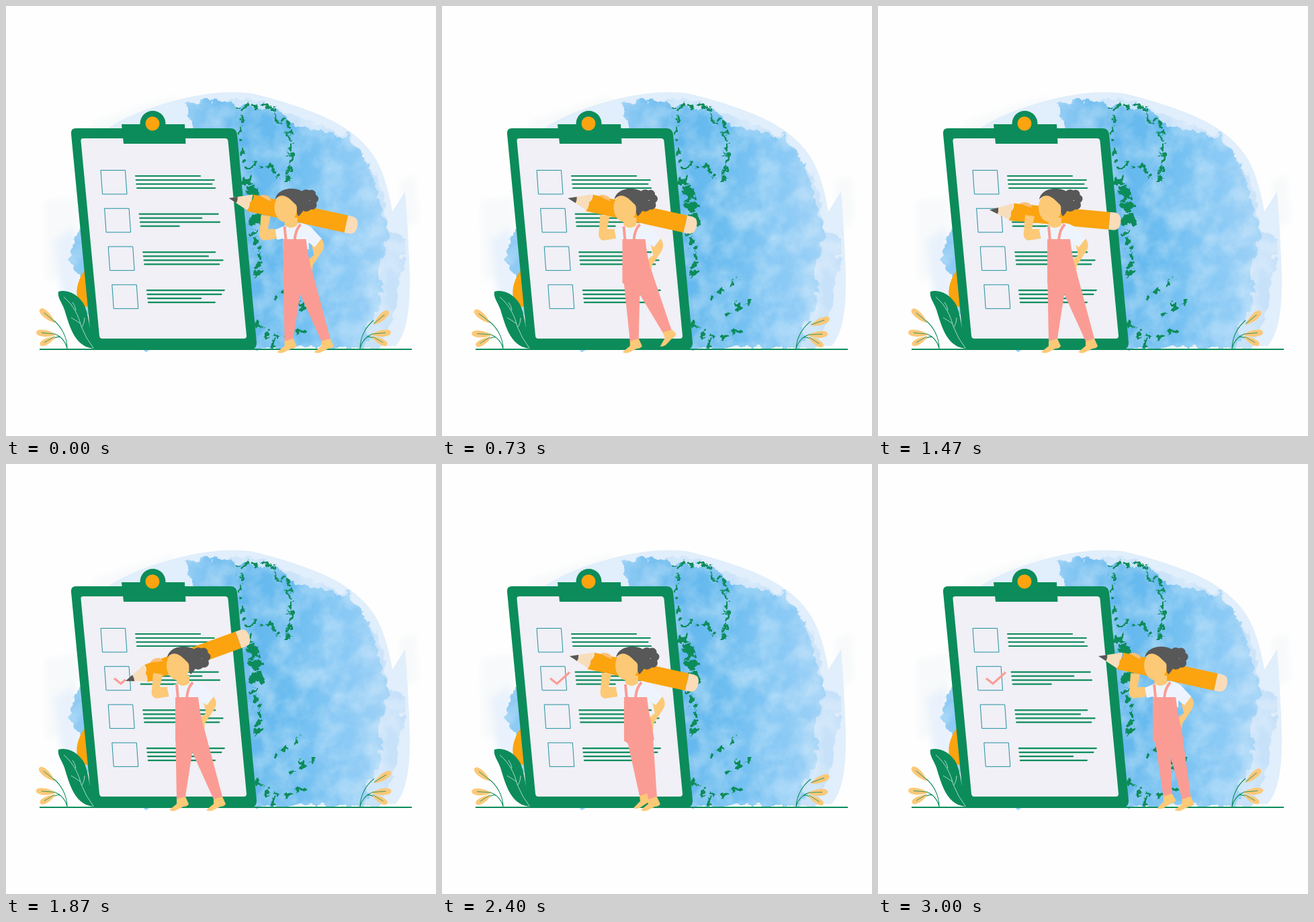
These frames come from a looping animation (640 px wide and 640 px high, 3.07 s). An HTML page:

```html
<!DOCTYPE html>
<html lang="en">
<head>
<meta charset="utf-8">
<title>Checklist</title>
<style>
html, body { margin: 0; width: 100%; height: 100%; overflow: hidden; background: #fefefe; }
svg { position: absolute; left: 0; top: 0; width: 640px; height: 640px; }
#paint { will-change: transform; }
.green { fill: #0c8c5a; }
.skin { fill: #fcc977; }
.pink { fill: #fb9c94; }
.hair { fill: #585858; }
.line { fill: none; stroke: #0c8c5a; }
</style>
</head>
<body>
<!-- Watercolour backdrop -->
<svg id="paint" viewBox="0 0 640 640">
  <defs>
    <linearGradient id="wash" gradientUnits="userSpaceOnUse" x1="270" x2="575" y1="0" y2="0">
      <stop offset="0" stop-color="#8dcaf4"/>
      <stop offset=".28" stop-color="#62b7ed"/>
      <stop offset=".5" stop-color="#6cbdf0"/>
      <stop offset=".75" stop-color="#86c8f5"/>
      <stop offset="1" stop-color="#a3d3f7"/>
    </linearGradient>
    <filter id="torn" filterUnits="userSpaceOnUse" x="0" y="90" width="640" height="450" color-interpolation-filters="sRGB">
      <feTurbulence type="fractalNoise" baseFrequency=".06" numOctaves="4" seed="4"/>
      <feDisplacementMap in="SourceGraphic" scale="20" xChannelSelector="R" yChannelSelector="G" result="shape"/>
      <feTurbulence type="fractalNoise" baseFrequency=".03" numOctaves="5" seed="9"/>
      <feColorMatrix values="0 0 0 0 1  0 0 0 0 1  0 0 0 0 1  .7 0 0 0 -.23"/>
      <feComposite in2="shape" operator="in" result="grain"/>
      <feMerge><feMergeNode in="shape"/><feMergeNode in="grain"/></feMerge>
    </filter>
    <filter id="rough" filterUnits="userSpaceOnUse" x="320" y="120" width="170" height="400">
      <feTurbulence type="fractalNoise" baseFrequency=".09" numOctaves="3" seed="7"/>
      <feDisplacementMap in="SourceGraphic" scale="18" xChannelSelector="R" yChannelSelector="G"/>
    </filter>
    <filter id="soft"><feGaussianBlur stdDeviation="4"/></filter>
  </defs>
  <g filter="url(#soft)">
    <path fill="#f7f9fa" d="M58 290L105 285 115 405 60 408ZM585 262L608 252 614 320 592 335ZM130 172L250 134 280 182 130 184Z"/>
    <path fill="#e9f2fc" d="M72 350L100 330 120 460 82 425Z"/>
  </g>
  <path fill="#e1eefb" d="M150 183Q190 156 262 138Q320 124 366 130Q420 143 462 160Q522 184 548 224Q566 252 575 306L594 276Q599 340 601 400Q603 480 580 506L372 510 340 183Z"/>
  <g filter="url(#torn)">
    <path fill="#c6e1f9" d="M270 145L370 140 440 165 510 195 556 260 570 335 592 345 590 400 575 470 555 508H400Z"/>
    <path fill="url(#wash)" d="M270 145L310 140 350 150 400 150 430 176 508 196 530 220 548 256 556 300 570 332 556 400 560 440 538 478 536 508H130L112 405 92 378 106 335 278 182Z"/>
  </g>
  <g class="line" filter="url(#rough)">
    <path stroke-width="4" stroke-dasharray="17 5 9 3" d="M345 151L398 148 402 168 420 176 424 212 421 262"/>
    <path stroke-width="5" stroke-dasharray="7 8 12 6" d="M348 163L352 238 390 236 410 258"/>
    <path stroke-width="15" stroke-dasharray="13 3 22 2" d="M356 255L370 285 376 325"/>
    <path stroke-width="8" stroke-dasharray="9 7 5 5" d="M364 318L380 378 372 408"/>
    <path stroke-width="6" stroke-dasharray="10 8" d="M398 440L420 420 440 405M424 464L445 442 466 440M398 490L424 493 446 482M374 470L402 506"/>
  </g>
</svg>

<svg viewBox="0 0 640 640">
  <defs>
    <g id="spike">
      <path fill="#fcc879" d="M15 1C4 7 -15 7 -15 0S4 -6 15 1Z"/>
      <path class="line" stroke-width=".8" d="M-7 0H14"/>
    </g>
    <g id="sprig">
      <path class="line" stroke-width="1.1" d="M91 510C91 492 82 477 71 468M91 510C88 497 79 489 70 488M81 493Q77 491 70 495"/>
      <use href="#spike" transform="translate(60 487) rotate(5)"/>
      <use href="#spike" transform="translate(62 498) rotate(-30) scale(.86 .9)"/>
    </g>
  </defs>

  <path fill="#fba410" d="M118 392C107 406 101 428 109 440Q114 448 122 448Z"/>
  <path class="green" d="M104 182H334Q343 182 344 191L373 501Q373 511 364 511H136Q128 511 127 502L97 191Q96 182 104 182Z"/>
  <path fill="#f0f0f6" d="M115 197H326Q330 197 330.500 201L358 491Q358 495 354 495H143Q139.500 495 139 491L111.500 201Q111 197 115 197Z"/>
  <circle class="green" cx="218.500" cy="175" r="19"/>
  <path class="green" d="M172 176H266L267.500 205H175Z"/>
  <circle cx="218" cy="175" r="10.500" fill="#fba410"/>
  <g id="list" class="line"></g>
  <path id="check" fill="none" stroke="#fb9c94" stroke-width="3.200" d="M161 319L171 327 190 310"/>

  <path class="green" d="M134 510C103 510 95 478 87 452C83 441 76 433 78 425C92 421 108 430 116 444C125 462 122 484 135 506Z"/>
  <path fill="none" stroke="#a9d8cf" d="M86 433C101 446 108 461 112 477Q119 495 130 509M104 453Q103 446 99 441M111 473Q101 466 97 464M113 478Q117 472 117 464"/>
  <path class="line" stroke-width="2" d="M50 511H604"/>

  <g id="left">
    <use href="#sprig"/>
    <use href="#spike" transform="translate(62 461) rotate(40)"/>
  </g>
  <g transform="matrix(-1 0 0 1 618 0)">
    <g id="right">
      <use href="#sprig"/>
      <g id="head"><use href="#spike" transform="translate(60 464) rotate(40)"/></g>
    </g>
  </g>

  <g id="girl">
    <g id="pencil">
      <path fill="#f8ddba" d="M0 0L34 -13V13Z"/>
      <path class="hair" d="M0 0L12.500 -4.800Q14 0 12.500 4.800Z"/>
      <path fill="#fba410" d="M35 -13H179V13H30Q34 6 32 0Q37 -6 35 -13Z"/>
      <path fill="#fbdcb8" d="M179 -13H187Q196 -12 196 0Q196 12 187 13H179Z"/>
      <path fill="#fcc07a" d="M44 -14Q51 -18 59 -15L63 -9Q53 -10 44 -14Z"/>
    </g>
    <path class="skin" d="M381 311L395 313 391 332 403 332 405 346 385 349Q377 346 379 336Z"/>
    <path class="skin" d="M456 354L471 346Q478 356 472 365L458 386 457 397Q450 400 447 389Q449 377 460 371Z"/>
    <path fill="#eef4fd" d="M402 333L416 327 440 323Q452 325 458 332L471 346 461 359 452 352V362H414V346L405 348Z"/>
    <path class="skin" d="M416 315H435V326Q425 334 416 326Z"/>
    <g id="farLeg"></g>
    <g id="nearLeg"></g>
    <path class="pink" d="M414 347H448Q450 368 455 388L459 410 438 428 414 412Z"/>
    <path fill="none" stroke="#fb9c94" stroke-width="4" d="M416 328L418 349M440 325Q432 333 431 349"/>
    <ellipse class="skin" cx="418" cy="300" rx="17" ry="22"/>
    <path class="hair" d="M402 288C404 274 424 267 441 275C452 284 449 302 437 313C431 306 438 299 431 294C424 287 413 275 402 288Z"/>
    <g class="hair">
      <circle cx="448" cy="282" r="9"/><circle cx="456" cy="280" r="6.500"/>
      <circle cx="460" cy="287" r="6.500"/><circle cx="457" cy="296" r="7"/>
      <circle cx="448" cy="297" r="9"/>
    </g>
  </g>
</svg>

<script>
const $ = id => document.getElementById(id);
const LOOP = 3070, TRAVEL = 162, TICK = $('check').getTotalLength();

const clamp = (v, a = 0, b = 1) => Math.min(b, Math.max(a, v));
const ease = u => (1 - Math.cos(Math.PI * clamp(u))) / 2;
const mix = (a, b, u) => a + (b - a) * u;

// Four blocks of a box and four lines, leaning with the board
const lengths = [96, 116, 112, 116, 117, 92, 118, 57, 107, 96, 117, 111, 115, 110, 79, 99];
$('list').innerHTML = lengths.map((len, n) => {
  const row = n >> 2, k = n % 4, lean = 5.6 * row;
  const box = k ? '' : `<path stroke="#2390a0" d="M${141 + lean} ${244.5 + row * 56.8}h36.500l2.500 35.500h-36.500z"/>`;
  return box + `<path stroke-width="2.200" stroke-linecap="round" d="M${193 + lean + k * .7} ${253 + row * 56.7 + k * 6}h${len}"/>`;
}).join('');

function leg(id, x, y, near) {
  const top = near ? '433 390L456 390' : '414 390L440 390L440 424';
  const inner = near ? 'L438 426' : '';
  const tilt = Math.min(0, (y - 497) * 1.7);
  $(id).innerHTML =
    `<path class="skin" transform="translate(${x} ${y}) rotate(${tilt})" d="M-6 -5H6L12 8Q10 12 4 12L-6 17Q-12 20 -17 17L-6 8Z"/>` +
    `<path class="pink" d="M${top}L${x + 7} ${y - 3}L${x - 6} ${y + 1}${inner}Z"/>`;
}

// The feet swing in opposition; the lag makes the rear foot trail on the way out
function walk(cycles, lag, lift) {
  const a = 2 * Math.PI * clamp(cycles, 0, 3);
  const swing = lag => 27 * Math.cos(a - lag) / Math.cos(lag);
  const rise = lift * Math.sin(a);
  leg('farLeg', 449 - swing(lag), 498 + Math.min(0, rise), false);
  leg('nearLeg', 450 + swing(2 * lag), 498 - Math.max(0, rise), true);
}

function draw(t) {
  const shift = -TRAVEL * (ease((t + 60) / 1000) - ease((t - 2200) / 900));
  $('girl').setAttribute('transform', `translate(${shift})`);
  if (t < 2170) walk(t / 333.3, .35, 14);
  else walk((t - 2170) / 293, 0, 5);

  // The pencil leaves the shoulder, follows the tick and goes back
  const drawn = clamp((t - 1600) / 465);
  const held = ease((t - 1333) / 267) - ease((t - 2065) / 205);
  const nib = $('check').getPointAtLength(drawn * TICK);
  const x = mix(333, nib.x - shift, held), y = mix(286, nib.y + 2, held);
  const angle = mix(12.4, -2 - 18 * ease(2 * drawn), held);
  $('pencil').setAttribute('transform', `translate(${x} ${y}) rotate(${angle})`);
  $('check').setAttribute('stroke-dasharray', `${drawn * TICK} 99`);
  $('check').style.display = drawn ? '' : 'none';

  const sway = (1 - Math.cos(4 * Math.PI * t / LOOP)) / 2;
  $('left').setAttribute('transform', `rotate(${-2 * sway} 91 510)`);
  $('right').setAttribute('transform', `rotate(${-3 * sway} 91 510)`);
  $('head').setAttribute('transform', `rotate(${-18 * sway} 71 474)`);
}

let last = -1;
function tick() {
  // 15 steps per second, starts rounded to 10 ms
  const t = Math.floor(performance.now() % LOOP / 10) * 10;
  const step = Math.floor((t + 3.4) * .015);
  if (step !== last) draw((last = step) * 200 / 3);
  requestAnimationFrame(tick);
}
tick();
</script>
</body>
</html>
```
